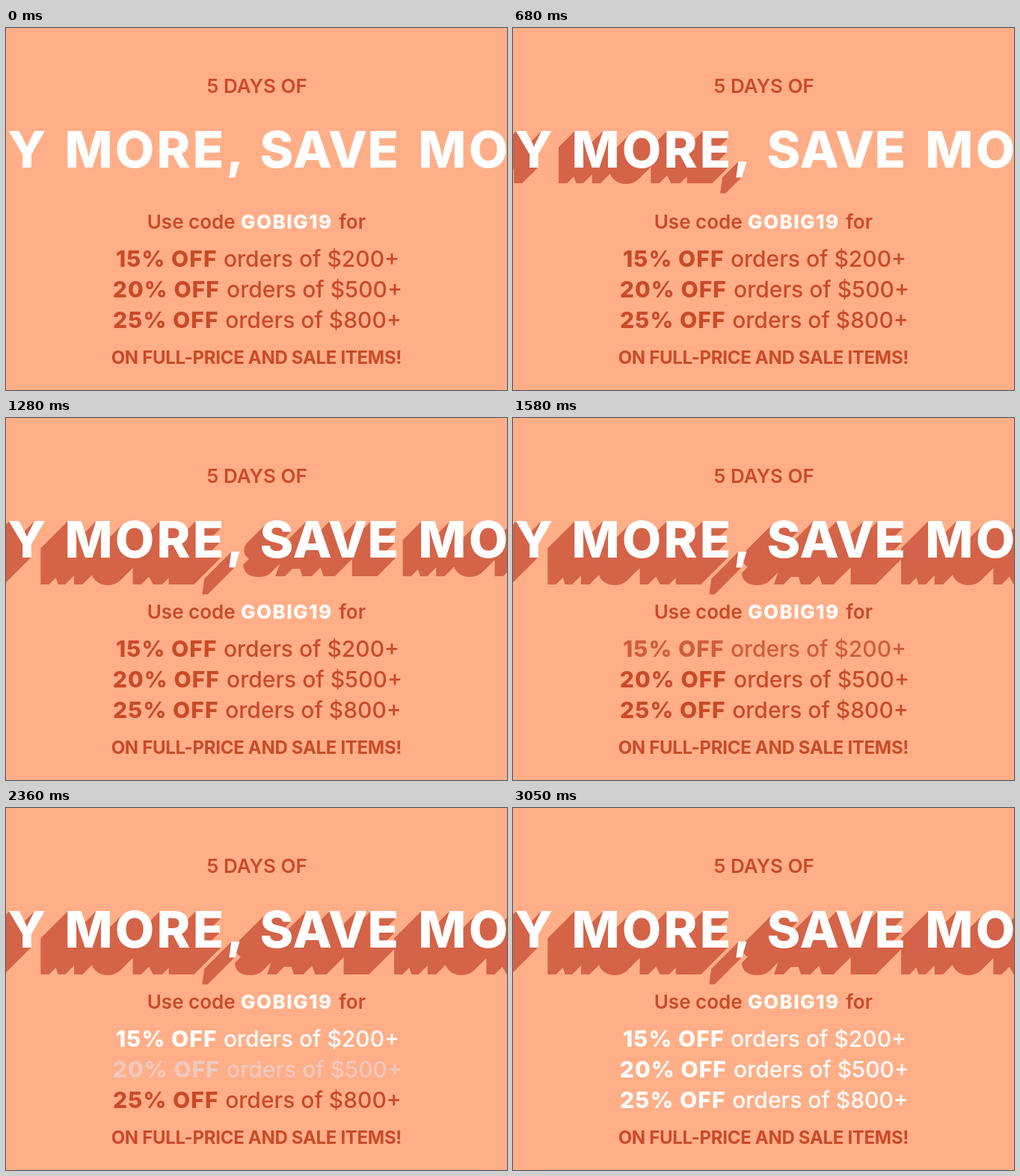
These frames come from a looping animation (670 by 485 pixels, 4200 ms). An HTML page with a canvas:

```html
<!DOCTYPE html>
<html lang="en">
<head>
<meta charset="utf-8">
<title>5 days of buy more, save more</title>
<style>
  html, body { margin: 0; width: 100%; height: 100%; overflow: hidden; background: #ffae87; }
  canvas { display: block; }
</style>
</head>
<body>
<canvas id="stage" width="670" height="485"></canvas>
<script>
const LOOP = 4200, STEP = 30;
const PEACH = '#ffae87', RUST = '#c84b2a', SHADE = '#d46449', WHITE = '#fff';
const ctx = document.getElementById('stage').getContext('2d');

// Each headline word: text, centre of its ink, letter spacing, start of its shadow.
const headline = [
  ['BUY', -21.5, 3, 500],
  ['MORE,', 197, 3.2, 500],
  ['SAVE', 432, 0.6, 1070],
  ['MORE', 658, 3.2, 1070]
];

// Each offer: percent, its centre, amount, centre of the rest, baseline, start of the fade.
const offers = [
  ['15%', 214.5, '$200+', 408, 320, 1580],
  ['20%', 214, '$500+', 412, 361, 2180],
  ['25%', 213.5, '$800+', 410.5, 402, 2780]
];

// Number of animation steps taken since start, from 0 to count.
function stepsAt(t, start, count) {
  return Math.max(0, Math.min(count, Math.floor((t - start) / STEP + 0.001) + 1));
}

function setFont(weight, size, spacing = 0) {
  ctx.font = `${weight} ${size}px Inter, "Liberation Sans", sans-serif`;
  ctx.letterSpacing = spacing + 'px';
}

// Left position that puts the middle of the visible ink at cx.
function inkStart(text, cx) {
  const m = ctx.measureText(text);
  return cx - (m.actualBoundingBoxRight - m.actualBoundingBoxLeft) / 2;
}

function label(text, cx, y, color) {
  ctx.fillStyle = color;
  ctx.fillText(text, inkStart(text, cx), y);
}

function fade(k) {
  const [r, g, b] = [200, 75, 42].map(c => Math.round(c + (255 - c) * k));
  return `rgb(${r},${g},${b})`;
}

function drawHeadline(t) {
  const y = 187;
  for (const [text, cx, spacing, start] of headline) {
    const n = stepsAt(t, start, 11);
    const depth = 2.6 * n + 0.061 * n * n;
    setFont(800, 68, spacing);
    const x = inkStart(text, cx);
    ctx.fillStyle = SHADE;
    for (let d = depth; d > 0; d--) ctx.fillText(text, x - d, y + d);
  }
  for (const [text, cx, spacing] of headline) {
    setFont(800, 68, spacing);
    label(text, cx, y, WHITE);
  }
}

function draw(t) {
  ctx.fillStyle = PEACH;
  ctx.fillRect(0, 0, 670, 485);
  drawHeadline(t);

  setFont(600, 26);
  label('5 DAYS OF', 336, 87, RUST);
  label('Use code', 248, 269, RUST);
  label('for', 463, 269, RUST);
  setFont(800, 26, 1.4);
  label('GOBIG19', 375, 269, WHITE);

  for (const [percent, cx, amount, restX, y, start] of offers) {
    const color = fade(stepsAt(t, start, 10) / 10);
    setFont(800, 30, 1.1);
    label(percent + ' OFF', cx, y, color);
    setFont(500, 30);
    label('orders of ' + amount, restX, y, color);
  }

  setFont(700, 24, -0.3);
  label('ON FULL-PRICE AND SALE ITEMS!', 335, 450, RUST);
}

function tick() {
  draw(performance.now() % LOOP);
  requestAnimationFrame(tick);
}
tick();
</script>
</body>
</html>
```
